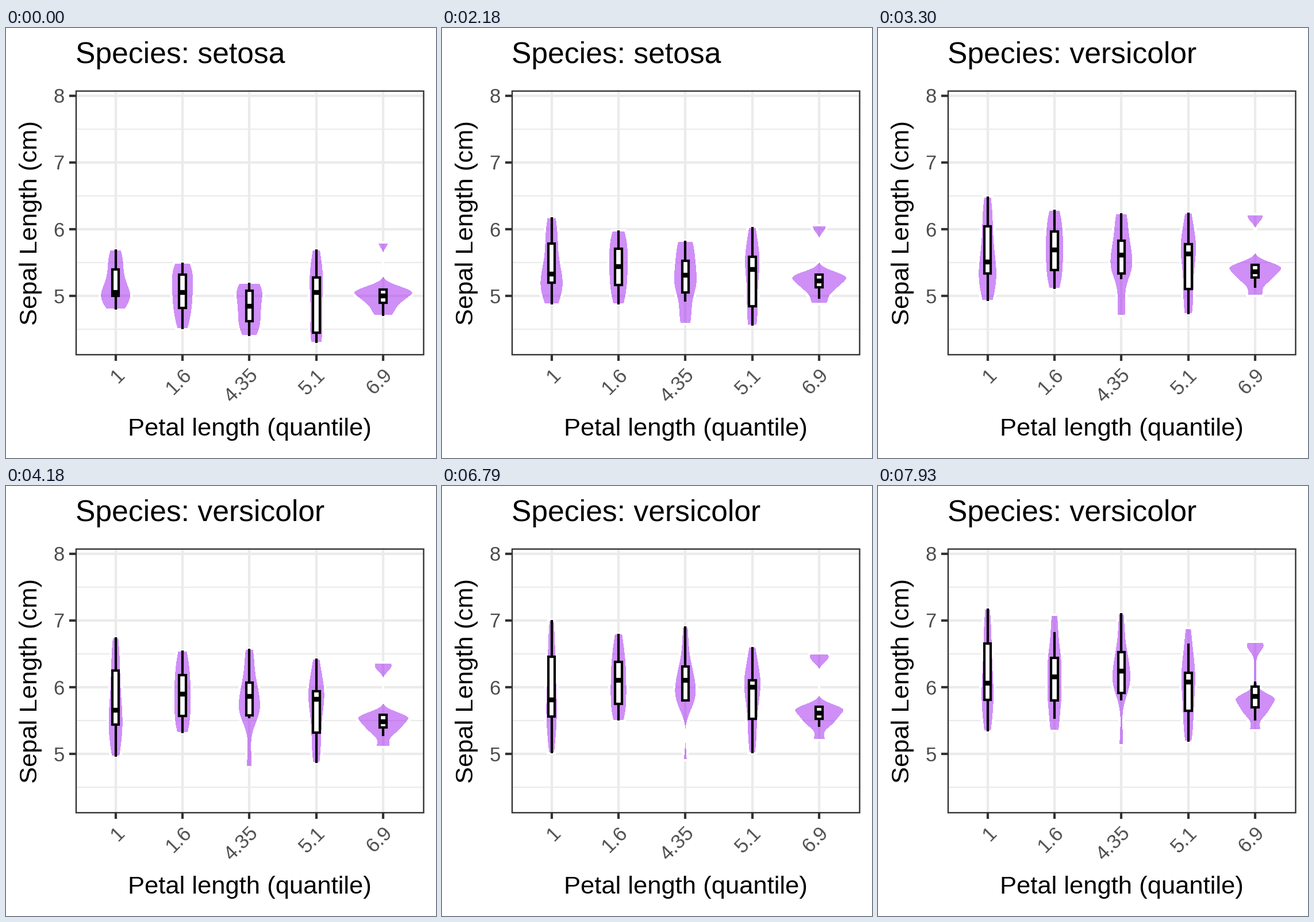
Recreate the animation shown at these times as a matplotlib script. Size 748 px wide and 748 px high, loop 8000 ms.

```python
import numpy as np
import matplotlib.pyplot as plt
from matplotlib.animation import FuncAnimation
from matplotlib.patches import Polygon, Rectangle

plt.rcParams["font.family"] = ["Liberation Sans"]

SIZE, DPI = 748, 100
PT = 72 / DPI              # points per pixel
LINE = 4.2 * PT
UNIT_X, UNIT_Y = 116.4, 116.25
LEFT, RIGHT, TOP, BOTTOM = 120.7, 726.8, 108.3, 568.6
LOOP, TICK = 8000, 20

NAMES = ["setosa", "versicolor", "virginica"]
LABELS = ["1", "1.6", "4.35", "5.1", "6.9"]

# evenly spaced key points of each box, from whisker end to whisker end
KEYS = [
    [(4.8, 5, 5.05, 5.4, 5.7), (4.5, 4.82, 5.05, 5.32, 5.5),
     (4.4, 4.62, 4.85, 5.08, 5.2), (4.3, 4.45, 5.05, 5.28, 5.7),
     (4.7, 4.9, 5, 5.1, 5.1)],
    [(5, 5.55, 5.8, 6.45, 7), (5.5, 5.75, 6.1, 6.38, 6.8),
     (5.8, 5.8, 6.1, 6.3, 6.9), (5, 5.52, 6, 6.1, 6.6),
     (5.4, 5.52, 5.6, 5.7, 5.7)],
    [(6.3, 6.8, 7.7), (5.6, 6.3, 6.9), (5.8, 6.65, 7.7),
     (5.7, 6.3, 6.8), (5.8, 6.6, 7.2)],
]
# values beyond the whiskers, by state and bin
OUTLIERS = {(0, 4): [5.8], (1, 2): [4.9], (1, 4): [5.2, 6.4, 6.5],
            (2, 1): [4.9, 7.9], (2, 3): [7.7]}


def px(i):
    return 190.6 + UNIT_X * i


def py(v):
    return 466.3 - (v - 5) * UNIT_Y


def spread(keys, n):
    return np.interp(np.linspace(0, 1, n), np.linspace(0, 1, len(keys)), keys)


def density(v, iqr, n=320):
    bw = 0.9 * min(v.std(ddof=1), iqr / 1.34) * len(v) ** -0.2
    y = np.linspace(v.min(), v.max(), n)
    k = np.exp(-0.5 * ((y[:, None] - v) / bw) ** 2)
    return y, k.mean(axis=1) / (bw * np.sqrt(2 * np.pi))


def violin_curve(state, i):
    far = OUTLIERS.get((state, i), [])
    sample = np.r_[spread(KEYS[state][i], 10 - len(far)), far]
    return density(sample, boxes[state, i, 3] - boxes[state, i, 1])


boxes = np.array([[spread(k, 5) for k in state] for state in KEYS])
curves = np.array([[violin_curve(s, i) for i in range(5)] for s in range(3)])
curves[:, :, 1] *= 0.45 * UNIT_X / curves[:, :, 1].max()

fig = plt.figure(figsize=(SIZE / DPI, SIZE / DPI), dpi=DPI, facecolor="white")
ax = fig.add_axes([0, 0, 1, 1])
ax.set(xlim=(0, SIZE), ylim=(SIZE, 0))
ax.axis("off")


def line(xs, ys, color, lw=LINE, z=1):
    return ax.plot(xs, ys, color=color, lw=lw, zorder=z,
                   solid_capstyle="butt")[0]


def label(x, y, s, size, color="black", **kw):
    return ax.text(x, y, s, fontsize=size * PT, color=color, va="baseline",
                   rotation_mode="anchor", **kw)


for v in (4.5, 5.5, 6.5, 7.5):
    line([LEFT, RIGHT], [py(v)] * 2, "#EBEBEB", LINE / 2, 0.5)
for v in (5, 6, 7, 8):
    line([LEFT, RIGHT], [py(v)] * 2, "#EBEBEB")
    line([LEFT - 10.8, LEFT], [py(v)] * 2, "#333333")
    label(101.5, py(v) + 12.5, str(v), 34.7, "#4D4D4D", ha="right")
for i, s in enumerate(LABELS):
    line([px(i)] * 2, [TOP, BOTTOM], "#EBEBEB")
    line([px(i)] * 2, [BOTTOM, BOTTOM + 10.8], "#333333")
    label(px(i) + 17, 605.5, s, 34.7, "#4D4D4D", ha="right", rotation=45)

ax.add_patch(Rectangle((122, 109.7), 604.5, 458.6, fill=False, ec="#333333",
                       lw=2.4 * PT, joinstyle="miter", snap=False, zorder=6))
title = label(121, 61, "", 51.6, ha="left")
label(424, 709.5, "Petal length (quantile)", 43.5, ha="center")
label(54, 339, "Sepal Length (cm)", 43.5, ha="center", rotation=90)


class Violin:
    def __init__(self, i):
        self.x = px(i)
        self.half = 0.05 * UNIT_X
        self.body = ax.add_patch(Polygon(
            [(0, 0)] * 3, fc=(160 / 255, 32 / 255, 240 / 255, 0.5),
            ec="white", lw=3 * PT, joinstyle="round", zorder=2,
            antialiased=False))
        self.whiskers = line([], [], "black", z=3)
        self.box = ax.add_patch(Rectangle(
            (self.x - self.half, 0), 2 * self.half, 1, fc="white",
            ec="black", lw=LINE, joinstyle="miter", zorder=4))
        self.median = line([], [], "black", 2 * LINE, 5)

    def update(self, curve, stats):
        y, w = py(curve[0]), curve[1]
        xs = np.r_[self.x - w, self.x + w[::-1]]
        self.body.set_xy(np.c_[xs, np.r_[y, y[::-1]]])
        low, q1, mid, q3, high = py(stats)
        self.whiskers.set_data([self.x] * 5, [low, q1, np.nan, q3, high])
        self.box.set_y(q3)
        self.box.set_height(q1 - q3)
        self.median.set_data([self.x - self.half, self.x + self.half],
                             [mid, mid])


violins = [Violin(i) for i in range(5)]


def steps(t):
    """Steps taken after t ms: two short ones, then a long one."""
    return 3 * (t // 140) + min(t % 140 // 20, 2)


def progress(t):
    """Position between the states, 100 steps from one to the next."""
    if t < 500:
        return 0
    if t < 6790:
        return min(steps(t - 500) + 1, 100)
    return 100 + steps(t - 6770)


def draw(n):
    state, step = divmod(progress(n * TICK + TICK // 2), 100)
    after, f = min(state + 1, 2), step / 100
    title.set_text("Species: " + NAMES[after if step > 50 else state])
    curve = curves[state] * (1 - f) + curves[after] * f
    stats = boxes[state] * (1 - f) + boxes[after] * f
    for violin, c, s in zip(violins, curve, stats):
        violin.update(c, s)
    return []


anim = FuncAnimation(fig, draw, frames=LOOP // TICK, interval=TICK,
                     repeat=True, repeat_delay=0)
plt.show()
```
